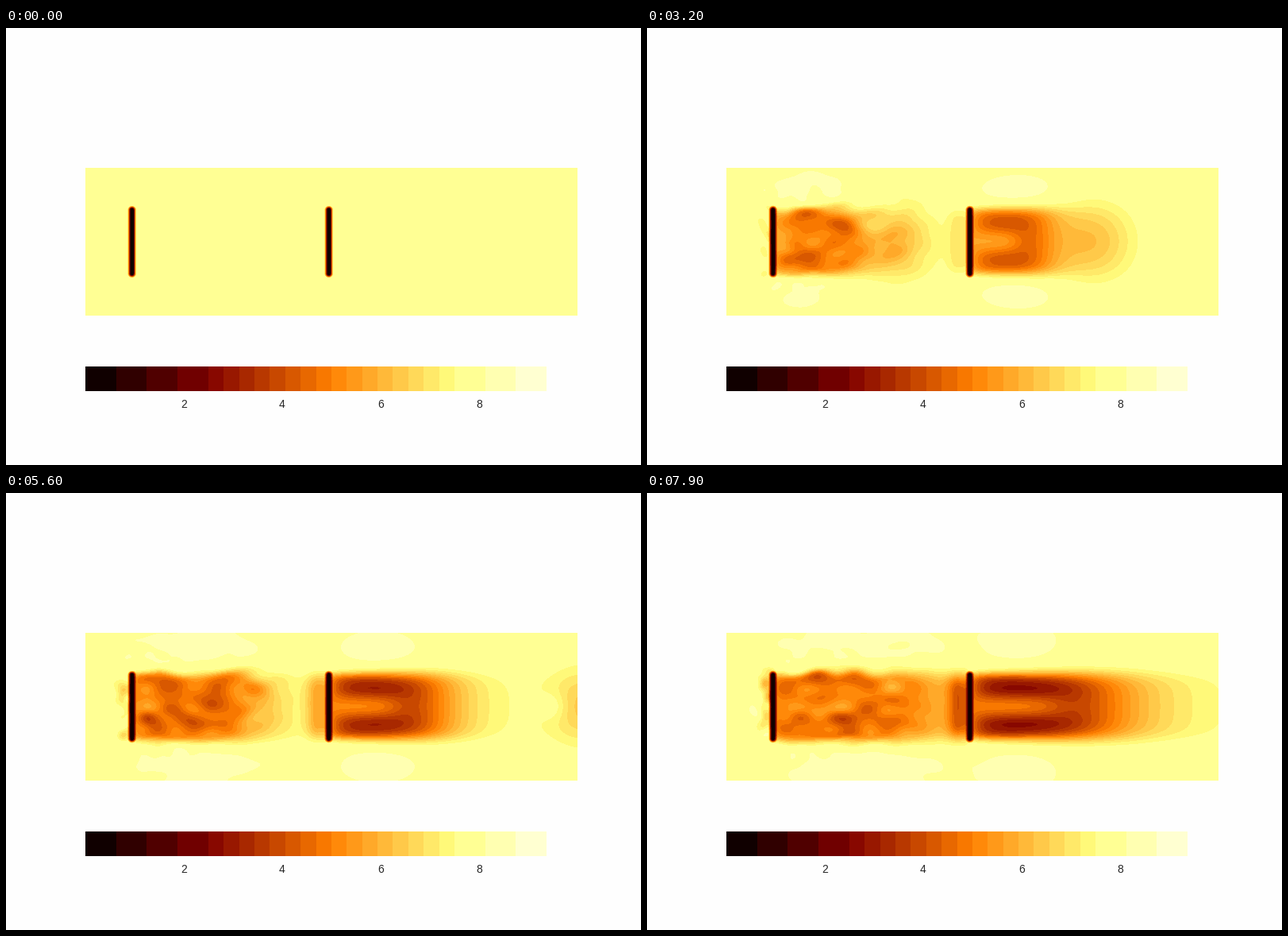
These frames come from a looping animation (800x550 px, 8000 ms). A matplotlib script:

```python
import numpy as np
import matplotlib.pyplot as plt
from matplotlib.animation import FuncAnimation

W, H, DPI = 800, 550, 100
FRAMES, STEP = 80, 100
PW, PH, UNIT = 620, 186, 62    # flow panel in pixels
WIND = 8
BAND = 10 / 32                 # speed range of one colour
PAGE = 254
ROTOR1, ROTOR2 = 58.7, 306.7

plt.rcParams["font.family"] = "Liberation Sans"

x = np.arange(PW) + 0.5
y = (np.arange(PH) + 0.5 - PH / 2)[:, None]
r = np.abs(y)


def make_palette():
    """Hot ramp in 32 bands; the ends are merged in pairs."""
    i = np.arange(32)
    paired = (i < 8) | (i > 23)
    pos = np.where(paired, i // 2 * 16 + 8, i * 8 + 4) / 255
    rgb = np.stack([2 * pos, 2 * pos - 0.5, 2 * pos - 1], 1).clip(0, 1) * 255
    rgb[24:26, 2] = 148
    rgb[30:] = PAGE
    return rgb.round().astype(np.uint8)


PALETTE = make_palette()


def paint(speed):
    return PALETTE[(speed / BAND).astype(int).clip(0, 31)]


def ramp(v, a, b):
    return np.clip((v - a) / (b - a), 0, 1)


def gauss(v, sigma):
    return np.exp(-0.5 * (v / sigma) ** 2)


def edge(v, mid, soft):
    return 1 / (1 + np.exp((v - mid) / soft))


class Noise:
    """Smooth drifting noise as a sum of random modes."""

    def __init__(self, seed, lx, ly, speed, churn, n=40):
        rng = np.random.default_rng(seed)
        self.kx = rng.normal(0, 2 * np.pi / lx, n)
        ky = rng.normal(0, 2 * np.pi / ly, n)
        self.phase = rng.uniform(0, 2 * np.pi, n)
        self.omega = rng.normal(0, churn, n) - self.kx * speed
        self.rows = np.cos(y * ky + rng.uniform(0, 2 * np.pi, n)) * 2 / n ** 0.5

    def __call__(self, t):
        return self.rows @ np.cos(np.outer(self.kx, x)
                                  + (self.phase + self.omega * t)[:, None])


eddies = Noise(4, 95, 50, 30, 0.4)
gusts = Noise(21, 45, 32, 8, 1.0)


def wake(t, s, yy):
    """Speed deficit s pixels behind a rotor."""
    rr = np.abs(yy)
    s = np.maximum(s, 0)
    reach = np.interp(t, [0, 1.5, 3.2, 7.9], [4, 92, 104, 192])
    depth = 5.7 * (1 - np.exp(-t / 2.6))
    body = depth / (1 + (s / reach) ** (7.5 - 0.37 * t))

    # two shear lobes around a weaker core that closes near the nose
    lobe = body * (1 - 0.5 * np.exp(-s / 15))
    core = body * (1 - 0.42 * edge(s / reach, 0.58, 0.08))
    mix = np.sin(np.pi / 2 * np.clip(rr / 24, 0, 1)) ** 2
    d = (core + (lobe - core) * mix) * edge(rr, 40, np.clip(3 + s / 70, 3, 6))

    # starting vortex carried off by the stream, faster air behind it
    front = 68 * t - 60
    d = d + 1.5 * ramp(t, 1.7, 3.2) * gauss(s - front, 35) * gauss(yy, 35)
    d = d - 0.7 * ramp(t, 3.2, 4.7) * gauss(s - front + 38, 13) * gauss(yy, 13)
    return d * ramp(s, 0, 3)


def bypass(t, cx, half):
    """Sped-up air above and below a wake."""
    off, tall = 56 + 3.4 * t, 13 + 1.5 * t
    return 0.32 * ramp(t, 0.5, 3) * np.exp(-((x - cx) / half) ** 2
                                           - ((r - off) / tall) ** 2)


def rotor(cx):
    dist = np.hypot(x - cx, np.maximum(r - 40, 0))
    return ramp(dist, 1.5, 5.7)


BLADES = rotor(ROTOR1) * rotor(ROTOR2)


def field(t):
    big, small = eddies(t), gusts(t)
    grow = ramp(t, 0, 3)
    s1, s2 = x - ROTOR1, x - ROTOR2

    # steady wake of the right rotor
    v = WIND - wake(t, s2, y + 0.5) + bypass(t, ROTOR2 + 62, 48)

    # turbulent, shallower wake of the left rotor
    churn = ramp(s1, 0, 20) * np.clip((215 - s1) / 70, 0.1, 1)
    d = np.maximum(wake(t, s1, y + 2 * grow * big * churn), 0)
    d = d / (1 + (d / 3.8) ** 4) ** 0.25
    d = d + 0.4 * grow * big * np.clip(d / 2.5, 0, 1) * churn
    v = v - d * ramp(ROTOR2 - x, 0, 6)
    v = v + bypass(t, ROTOR1 + 15 * t, 20 + 10 * t) * (1 + 0.35 * big)

    # rough air close around the left rotor
    v = v + 0.13 * grow * small * gauss(r - 58, 8) * gauss(s1 - 30, 32)
    near = ramp(s1, -32, -12) * ramp(-s1, -4, 0)
    v = v - 0.14 * t * near * (0.8 + 0.5 * small) * edge(r, 47, 4)

    # air slowing down ahead of the right rotor
    ahead = gauss(np.minimum(s2 + 14, 0), 10) * (s2 < 0)
    v = v - 2.4 * ramp(t, 0.8, 7) * ahead * edge(r, 38, 5)
    return v * BLADES


def panel(fig, top, height, img):
    ax = fig.add_axes([100 / W, 1 - (top + height) / H, PW / W, height / H])
    for side in ax.spines.values():
        side.set_visible(False)
    ax.set_facecolor("none")
    ax.set(xticks=[], yticks=[])
    return ax.imshow(img, aspect="auto", interpolation="nearest",
                     extent=(0, 10, 0, 3))


fig = plt.figure(figsize=(W / DPI, H / DPI), dpi=DPI, facecolor=(PAGE / 255,) * 3)
flow = panel(fig, 176, PH, paint(field(0)))
bar = panel(fig, 426, 31, paint(np.tile(x / UNIT, (31, 1))))
bar.axes.set_xticks([2, 4, 6, 8])
bar.axes.tick_params(length=0, pad=7, labelsize=10, labelcolor="#262626")


def update(i):
    flow.set_data(paint(field(i * STEP / 1000)))
    return [flow]


anim = FuncAnimation(fig, update, frames=FRAMES, interval=STEP,
                     repeat=True, repeat_delay=0)
plt.show()
```
